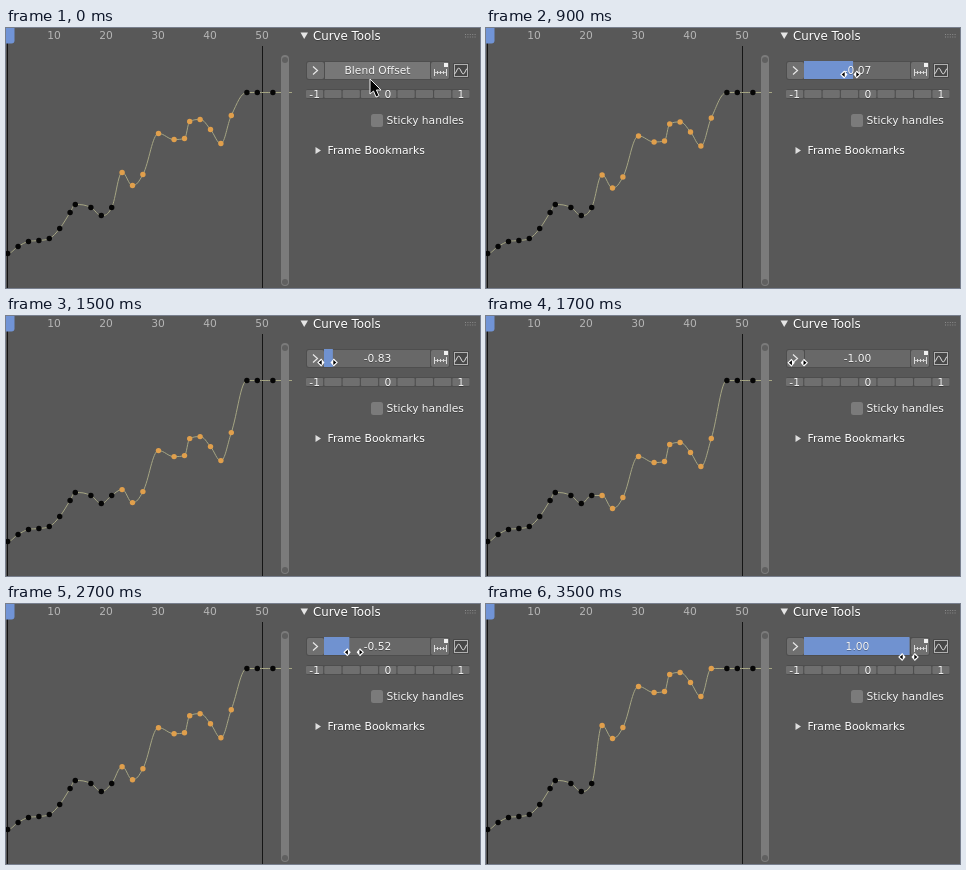
Write an HTML page with a canvas that moves like this. It is 474x260 px and loops after 3.6 s.

```html
<!DOCTYPE html>
<html>
<head>
<meta charset="utf-8">
<style>
html, body { margin: 0; width: 100%; height: 100%; overflow: hidden; background: #585858; }
canvas { display: block; }
</style>
</head>
<body>
<canvas id="stage" width="474" height="260"></canvas>
<script>
const ctx = document.getElementById('stage').getContext('2d');
const LOOP = 3600, STEP = 100, PRESS = 300, DRAG_START = 800;
const REACH = .39; // handle length as a share of the gap between keys

const frameX = f => 5.2 * f - 3.5;
const isSelected = f => f > 21 && f < 47;
const clamp = (v, lo, hi) => Math.max(lo, Math.min(hi, v));

// Animation keys: frame and height on stage
const keys = [
  [1,225], [3,218], [5,213], [7,212], [9,210], [11,200], [13,184], [14,176], [17,179], [19,187], [21,179],
  [23,144], [25,157], [27,146], [30,105], [33,111], [35,110], [36,93], [38,91], [40,101], [42,115], [44,87],
  [47,64], [49,64], [52,64]
];

// Turning points of the drag: time and unclamped value
const turns = [[800,0], [1200,-.28], [1700,-1.2], [2200,-.3], [2600,-.95], [2700,-.52], [3500,1]];

function drag(t) {
  const next = turns.findIndex(([time]) => time >= t);
  if (next === 0) return 0;
  if (next < 0) return 1;
  const [[t0, v0], [t1, v1]] = turns.slice(next - 1, next + 1);
  return v0 + (v1 - v0) * (t - t0) / (t1 - t0);
}

function box(x, y, w, h, color, r = 0) {
  ctx.fillStyle = color;
  ctx.beginPath();
  ctx.roundRect(x, y, w, h, r);
  ctx.fill();
}

function poly(points, fill, stroke, width = 1) {
  ctx.beginPath();
  points.forEach(([x, y]) => ctx.lineTo(x, y));
  if (fill) {
    ctx.closePath();
    ctx.fillStyle = fill;
    ctx.fill();
  }
  if (stroke) {
    ctx.strokeStyle = stroke;
    ctx.lineWidth = width;
    ctx.stroke();
  }
}

function dot(x, y, r, color) {
  ctx.fillStyle = color;
  ctx.beginPath();
  ctx.arc(x, y, r, 0, 7);
  ctx.fill();
}

function label(text, x, y, { align = 'left', size = 10.7, color = '#f4f4f4', shadow = true } = {}) {
  ctx.font = size + 'px "DejaVu Sans", sans-serif';
  ctx.textAlign = align;
  if (shadow) {
    ctx.fillStyle = 'rgba(0,0,0,.3)';
    ctx.fillText(text, x, y + 1);
  }
  ctx.fillStyle = color;
  ctx.fillText(text, x, y);
}

// Automatic slope: flat at peaks and valleys, never past a neighbour's height
function slope(a, b, c) {
  if (!a || !c) return 0;
  const dx0 = b.x - a.x, dx1 = c.x - b.x, dy0 = b.y - a.y, dy1 = c.y - b.y;
  if (dy0 * dy1 <= 0) return 0;
  const limit = Math.min(Math.abs(dy0 / dx0), Math.abs(dy1 / dx1)) / REACH;
  return clamp((dy0 / dx0 + dy1 / dx1) / 2, -limit, limit);
}

function drawCurve(points) {
  const slopes = points.map((p, i) => slope(points[i - 1], p, points[i + 1]));
  ctx.beginPath();
  ctx.moveTo(points[0].x, points[0].y);
  for (let i = 1; i < points.length; i++) {
    const a = points[i - 1], b = points[i], reach = (b.x - a.x) * REACH;
    ctx.bezierCurveTo(a.x + reach, a.y + slopes[i - 1] * reach,
      b.x - reach, b.y - slopes[i] * reach, b.x, b.y);
  }
  ctx.lineTo(286, points[points.length - 1].y);
  ctx.strokeStyle = '#a5a583';
  ctx.lineWidth = 1;
  ctx.stroke();
}

function drawGraph(value) {
  for (let f = 10; f <= 50; f += 10)
    label(f, frameX(f) - .5, 11, { align: 'center', color: '#b5b5b5', shadow: false });
  box(1, 15, 1, 245, '#151515');
  box(256, 18, 1, 242, '#151515');
  box(-4, -4, 12.5, 19.5, '#7194d6', 3);

  const shift = -value * (value < 0 ? 35 : 23);
  const points = keys.map(([f, y]) => {
    const selected = isSelected(f);
    return { x: frameX(f), y: y + .5 + (selected ? shift : 0), selected };
  });
  drawCurve(points);
  points.forEach(p => dot(p.x, p.y, 2.7, p.selected ? '#e09f4c' : '#050505'));

  box(275, 27, 8, 231, '#7b7b7b', 4);
  dot(279, 32, 3, '#606060');
  dot(279, 254, 3, '#606060');
}

function drawSlider(value, dragging) {
  box(300, 33, 144, 19, '#4e4e4e', 3);
  box(301, 34, 17, 17, '#707070', 2);
  poly([[307, 38.5], [311.5, 42.5], [307, 46.5]], null, '#e8e8e8', 1.2);
  box(319, 34, 105, 17, dragging ? '#686868' : '#777');
  if (dragging) box(318, 33, 105.5 * (value + 1) / 2, 18, '#7092d0');
  label(dragging ? value.toFixed(2) : 'Blend Offset', 371.5, 46, { align: 'center' });
}

function drawIcons() {
  box(425, 34, 18, 17, '#707070', 2);
  box(428, 44, 13, 1, '#c4c4c4');
  for (let i = 0; i < 5; i++) {
    const tall = i % 4 === 0;
    box(428 + i * 3, tall ? 41 : 43, 1, tall ? 7 : 3, '#dcdcdc');
  }
  box(438, 35, 4, 4, '#f0f0f0');

  box(447, 35, 16, 15, '#474747', 1);
  ctx.strokeStyle = '#b0b0b0';
  ctx.lineWidth = 1;
  ctx.strokeRect(448.5, 36.5, 13, 12);
  const wave = Array.from({ length: 14 }, (_, i) => [448.5 + i, 43 - 3 * Math.sin((i - 2) * .7)]);
  poly(wave, null, '#e2e2e2');
}

function drawScale() {
  box(300, 61, 164, 10, '#4e4e4e', 2);
  for (let i = 0; i < 9; i++) {
    const x = 300 + i * 18.3;
    box(x, 62, 17.2, 8, '#6f6f6f', 1);
    if (i % 4 === 0) label(i / 4 - 1, x + 8.6, 70, { align: 'center' });
  }
}

function drawPanel(value, dragging) {
  poly([[294.5, 4.5], [302, 4.5], [298.2, 11]], '#e6e6e6');
  label('Curve Tools', 307, 11.5, { size: 11.8, color: '#fff' });
  for (let i = 0; i < 10; i++) box(459 + i % 5 * 2.4, i < 5 ? 6 : 8.5, 1, 1, '#8b8b8b');

  drawSlider(value, dragging);
  drawIcons();
  drawScale();

  box(365, 86, 12, 13, '#7b7b7b', 2.5);
  label('Sticky handles', 380.5, 96);
  poly([[309.5, 119], [315, 122.5], [309.5, 126]], '#dedede');
  label('Frame Bookmarks', 321.5, 126, { size: 10.8, color: '#fff' });
}

function drawArrow(x, y) {
  const arrow = [[0,0], [0,15], [3.5,12], [6,18], [9,16.7], [6.4,11], [11,11], [0,0]];
  poly(arrow.map(([a, b]) => [x + a, y + b]), '#050505', '#f2f2f2');
}

function drawGrip(x, y) {
  for (const side of [-1, 1]) {
    const at = (a, b) => [x + side * a, y + b];
    poly([at(3, 0), at(6.3, -4), at(10.3, 0), at(6.3, 4)], '#fff');
    poly([at(5.8, -2.5), at(8.8, 0), at(5.8, 2.5)], '#050505');
  }
}

function drawPointer(t) {
  if (t < PRESS) return drawArrow(364 + 5 * t / PRESS, 51 - 5 * t / PRESS);
  // The hand runs slightly ahead of the value and sinks toward the end
  drawGrip(370 + 52.5 * drag(t + 50), 46.5 + 7.5 * (t / LOOP) ** 5);
}

function frame(now) {
  const t = Math.floor(now % LOOP / STEP) * STEP;
  const value = clamp(drag(t), -1, 1);
  box(0, 0, 474, 260, '#585858');
  drawGraph(value);
  drawPanel(value, t >= DRAG_START);
  drawPointer(t);
}

const start = performance.now();
function tick() {
  frame(performance.now() - start);
  requestAnimationFrame(tick);
}
tick();
</script>
</body>
</html>
```
